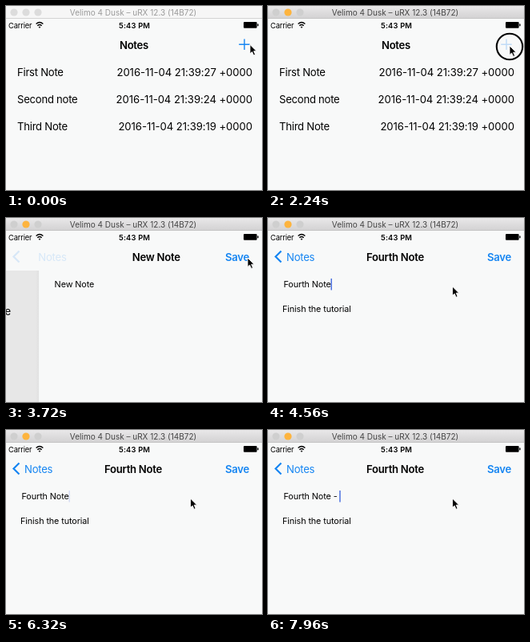
Write an HTML page that moves like this. It is 320 px wide and 231 px high and loops after 8 s.

```html
<!DOCTYPE html>
<html lang="en">
<head>
<meta charset="utf-8">
<title>Notes</title>
<style>
  html, body { margin: 0; width: 100%; height: 100%; overflow: hidden; background: #f8f9f9; }
  svg { display: block; width: 100%; height: 100%; }
  text { font: 13.14px Inter, "Open Sans", sans-serif; letter-spacing: -.26px; white-space: pre; }
  .mid { text-anchor: middle; }
  .end { text-anchor: end; }
  .bold { font-weight: 600; }
  .blue { fill: #1585f2; }
  .line { fill: none; stroke: #1585f2; }
  .date { letter-spacing: -.06px; text-anchor: end; }
  .field { font-size: 10.8px; letter-spacing: -.1px; }
  .status { font-size: 9.3px; letter-spacing: -.15px; }
  .time { letter-spacing: .2px; }
  .bar { font-size: 10px; letter-spacing: 0; }
</style>
</head>
<body>
<svg viewBox="0 0 320 231" preserveAspectRatio="none">
  <defs>
    <linearGradient id="chrome" x2="0" y2="1">
      <stop stop-color="#e9e8e9"/><stop offset="1" stop-color="#d2d1d2"/>
    </linearGradient>
    <linearGradient id="fade">
      <stop stop-opacity="0"/><stop offset="1" stop-opacity=".18"/>
    </linearGradient>
  </defs>
  <rect width="320" height="231" fill="#f8f9f9"/>

  <g id="list">
    <text x="14" y="88">First Note</text><text class="date" x="308" y="88">2016-11-04 21:39:27 +0000</text>
    <text x="14" y="122">Second note</text><text class="date" x="308" y="122">2016-11-04 21:39:24 +0000</text>
    <text x="14" y="156">Third Note</text><text class="date" x="308" y="156">2016-11-04 21:39:19 +0000</text>
  </g>
  <rect id="dim" y="66" width="320" height="165"/>

  <g id="page">
    <rect id="shadow" x="-5" y="66" width="5" height="165" fill="url(#fade)"/>
    <rect y="66" width="320" height="165" fill="#f8f9f9"/>
    <text id="name" class="field" x="19.5" y="87"></text>
    <text id="body" class="field" x="18" y="118">Finish the tutorial</text>
    <rect id="caret" y="76" width="1.4" height="14.5" fill="#4168de"/>
  </g>

  <rect y="16" width="320" height="50" fill="#f8f9f9"/>
  <text id="oldTitle" class="mid bold" y="53.5">Notes</text>
  <text id="newTitle" class="mid bold" y="53.5"></text>
  <text id="back" class="blue" y="53.5">Notes</text>
  <path id="chevron" class="line" stroke-width="2.2" d="M16.5 41.5l-7 7 7 7"/>
  <text id="save" class="end bold blue" x="304" y="53.5">Save</text>
  <path id="plus" class="line" stroke-width="1.4" d="M291.2 48.2h13.5M298 41.5v13.5"/>

  <text class="status" x="3" y="27.5">Carrier</text>
  <g fill="none" stroke="#000" stroke-width="1.4">
    <path d="M37.6 22.6q4.4-4 8.8 0M39.3 24.7q2.7-2.4 5.4 0"/>
    <path d="M41 26.2h2L42 27.5z" fill="#000" stroke-width=".6"/>
  </g>
  <text class="status time mid bold" x="160.6" y="27.5">5:43 PM</text>
  <rect x="297" y="20" width="16.6" height="7.7" rx="1"/>
  <rect x="314.2" y="22.3" width="1.4" height="3" rx=".6"/>

  <rect id="chromeBar" width="320" height="16"/>
  <rect y="15.4" width="320" height=".6" fill="#bdbdbd"/>
  <g id="lights" fill="#d2d2d2">
    <circle cx="10" cy="8" r="4.6"/><circle id="amber" cx="25" cy="8" r="4.6"/><circle cx="40" cy="8" r="4.6"/>
  </g>
  <text id="caption" class="bar mid" x="159" y="11.5">Velimo 4 Dusk – uRX 12.3 (14B72)</text>

  <circle id="ring" cx="302" cy="51" r="16.2" fill="none" stroke="#000" stroke-width="2.1"/>
  <path id="pointer" d="M0 0V11.4L2.6 9 4.6 13.4 6.6 12.5 4.7 8.2H8.2z" stroke="#fff" stroke-width=".9"/>
</svg>
<script>
const LOOP = 8000, CLICK = 720, RELEASE = 3168, PUSHED = 3928, CUT = 4000;
const el = {};
document.querySelectorAll('[id]').forEach(e => el[e.id] = e);
const clamp = v => Math.max(0, Math.min(1, v));
const span = (t, a, b) => clamp((t - a) / (b - a));
const smoother = u => u * u * u * (u * (6 * u - 15) + 10);
const set = (id, attrs) => { for (const k in attrs) el[id].setAttribute(k, attrs[k]); };
const alpha = (id, v) => set(id, { opacity: clamp(v) });
const move = (id, x, y) => set(id, { transform: `translate(${x} ${y})` });
const write = (id, s) => { if (el[id].textContent !== s) el[id].textContent = s; };

function drawChrome(active) {
  set('amber', { fill: active ? '#fdb43e' : '#dcdcdc' });
  set('lights', { fill: active ? '#cfcfcf' : '#dcdcdc' });
  set('chromeBar', { fill: active ? 'url(#chrome)' : '#f6f6f6' });
  set('caption', { fill: active ? '#444' : '#9a9a9a' });
}

function drawPush(p) {
  move('list', -96 * p, 0);
  alpha('dim', .08 * p);
  move('page', 320 * (1 - p), 0);
  alpha('page', p > 0 ? 1 : 0);
  alpha('shadow', 1 - p);
  set('oldTitle', { x: 160 - 96 * p });
  alpha('oldTitle', 1 - 3 * p);
  set('newTitle', { x: 159 + 224 * (1 - p) });
  alpha('newTitle', 1.5 * p);
  const late = (p - .85) / .15;
  set('back', { x: 23 + 135 * (1 - p) });
  alpha('back', late);
  alpha('chevron', late);
  alpha('save', 1.15 * p);
}

function drawNote(t) {
  const edited = t >= CUT;
  const typed = [6640, 7080, 7520].filter(at => t >= at).length;
  write('name', edited ? 'Fourth Note' + ' - '.slice(0, typed) : 'New Note');
  write('newTitle', edited ? 'Fourth Note' : 'New Note');
  alpha('body', edited ? 1 : 0);
  set('caret', { x: 19.3 + el.name.getComputedTextLength() });
  alpha('caret', edited ? 1 - span(t, 5800, 6000) + span(t, 6280, 6480) : 0);
}

function draw(t) {
  const p = smoother(span(t, RELEASE, PUSHED));
  drawChrome(t >= CLICK);
  drawPush(p);
  drawNote(t);
  alpha('plus', (t < CLICK ? 1 : .25) * (1 - 2 * p));
  alpha('ring', t >= CLICK && t < RELEASE ? 1 : 0);
  const near = smoother(span(t, 40, 640));
  if (t < CUT) move('pointer', 305 - 3 * near, 48.5 + 1.5 * near);
  else move('pointer', 230.5, 86);
}

const start = performance.now();
function tick() {
  draw((performance.now() - start) % LOOP);
  requestAnimationFrame(tick);
}
tick();
</script>
</body>
</html>
```
